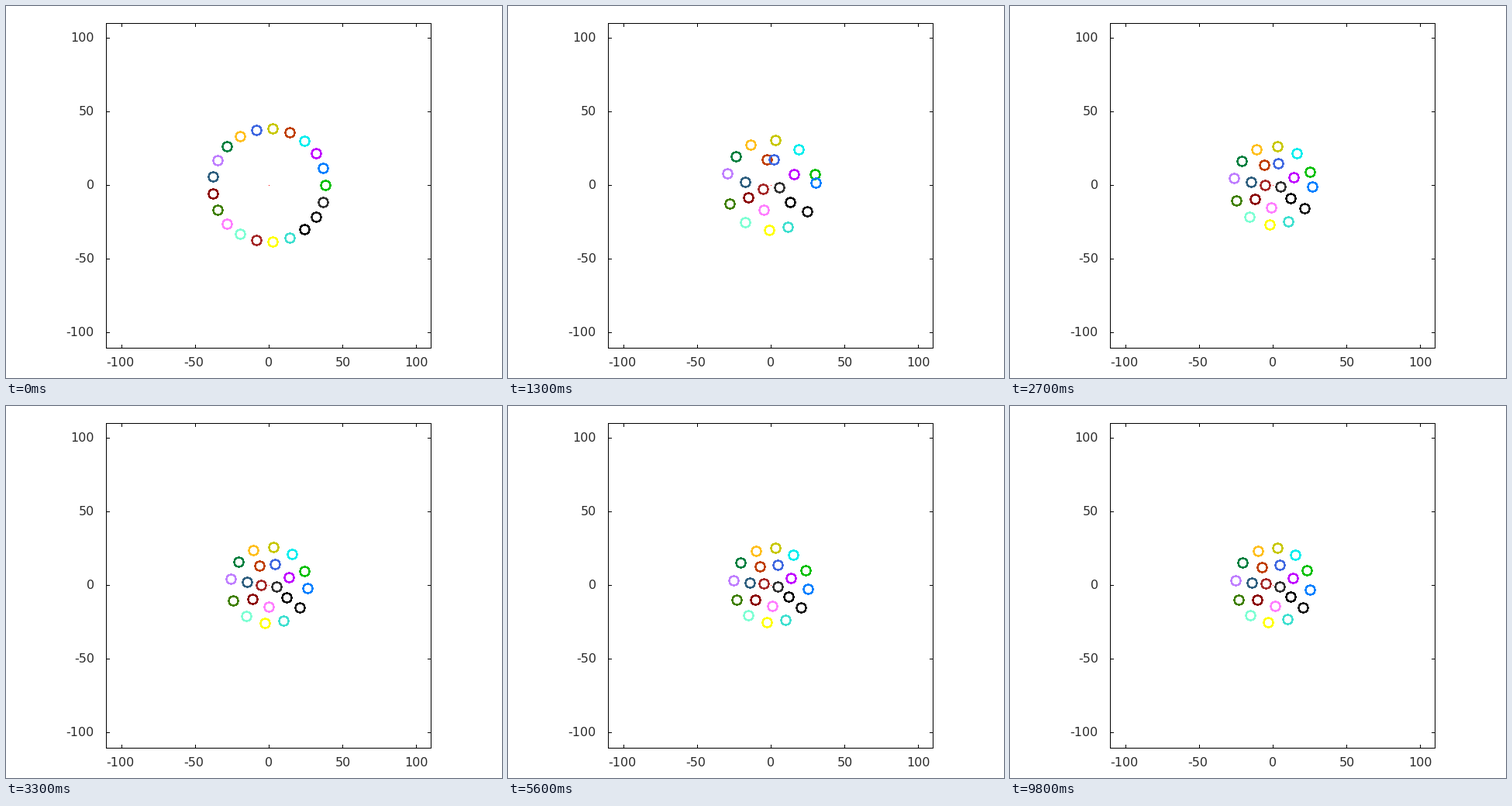
A matplotlib script for the animation above (9.9 s loop, 640 px wide and 480 px high).

```python
import numpy as np
import matplotlib.pyplot as plt
from matplotlib.animation import FuncAnimation
from matplotlib.patches import Rectangle

W, H, DPI = 640, 480, 100
PX = 72 / DPI                      # one pixel in points
LEFT, RIGHT, TOP, BOTTOM = 129.5, 548.5, 22.5, 441.5
CENTER = np.array([339.5, 231.5])
SCALE = (RIGHT - LEFT) / 220       # pixels per axis unit
FRAMES, STEP = 99, 100

COLORS = """#00c000 #0080ff #c000ff #00eeee #c04000 #c8c800 #4169e1
#ffc020 #008040 #c080ff #306080 #8b0000 #408000 #ff80ff #7fffd4 #a52a2a
#ffff00 #40e0d0 #000000 #1a1a1a #333333""".split()
COUNT = len(COLORS)

# The ring collapses, rebounds and relaxes into three concentric shells
RING_RADIUS = 73.3
PINCH_TIME, REBOUND_TIME = 600, 1250
OVERSHOOT, RELAX, TURN = 0.22, 1000, 1500

# members in angular order, first angle, pinched radius, resting radius
SHELLS = [
    ((1, 0, 3, 5, 7, 8, 9, 12, 14, 16, 17, 19), -6.7, 39, 48.3),
    ((2, 6, 4, 10, 11, 13, 18), 18.5, 17, 27.3),
    ((15, 20), 168, 4, 9.5),
]

start_angle = 360 * np.arange(COUNT) / COUNT
rest_angle, pinch_radius, rest_radius = np.zeros((3, COUNT))
for members, first, pinch, rest in SHELLS:
    who = list(members)
    rest_angle[who] = first + 360 * np.arange(len(who)) / len(who)
    pinch_radius[who] = pinch
    rest_radius[who] = rest
turn = (rest_angle - start_angle + 180) % 360 - 180


def blend(a, b, u):
    return a + (b - a) * (1 - np.cos(np.pi * u)) / 2


def radii(ms):
    peak = rest_radius * (1 + OVERSHOOT)
    if ms < PINCH_TIME:
        return blend(RING_RADIUS, pinch_radius, ms / PINCH_TIME)
    if ms < REBOUND_TIME:
        u = (ms - PINCH_TIME) / (REBOUND_TIME - PINCH_TIME)
        return blend(pinch_radius, peak, u)
    fade = np.exp(-(ms - REBOUND_TIME) / RELAX)
    return rest_radius * (1 + OVERSHOOT * fade)


def positions(ms):
    a = np.radians(start_angle + turn * (1 - np.exp(-ms / TURN)))
    offsets = np.column_stack([np.cos(a), -np.sin(a)]) * radii(ms)[:, None] \
        if ms else RING_RADIUS * np.column_stack([np.cos(a), -np.sin(a)])
    return np.floor(CENTER + offsets) + 0.5    # whole pixels


fig = plt.figure(figsize=(W / DPI, H / DPI), dpi=DPI, facecolor="white")
ax = fig.add_axes([0, 0, 1, 1])
ax.set(xlim=(0, W), ylim=(H, 0))
ax.axis("off")


def line(xs, ys):
    ax.plot(xs, ys, color="black", lw=PX, solid_capstyle="projecting",
            snap=False, zorder=1)


def label(x, y, text, align):
    ax.text(x, y, text, ha=align, va="baseline", color="#2a2a2a",
            family="DejaVu Sans", size=16 * PX)


for x in (LEFT, RIGHT):
    line([x, x], [TOP, BOTTOM])
for y in (TOP, BOTTOM):
    line([LEFT, RIGHT], [y, y])

for value in range(-100, 101, 50):
    x = np.floor(CENTER[0] + value * SCALE) + 0.5
    y = np.floor(CENTER[1] - value * SCALE) + 0.5
    line([x, x], [BOTTOM, BOTTOM - 4])
    line([x, x], [TOP, TOP + 4])
    line([LEFT, LEFT + 4], [y, y])
    line([RIGHT, RIGHT - 4], [y, y])
    label(x - 2 * (value < 0), 465, str(value), "center")
    label(114, y + 4.5, str(value), "right")

# Marker at the origin
ax.add_patch(Rectangle(CENTER - 0.5, 1, 1, fc="red", ec="none", snap=False))

dots = ax.scatter(*positions(0).T, s=(12 * PX) ** 2, facecolors="none",
                  edgecolors=COLORS, linewidths=1.1 * PX,
                  antialiased=False, zorder=3)


def update(frame):
    dots.set_offsets(positions(frame * STEP))
    return dots,


anim = FuncAnimation(fig, update, frames=FRAMES, interval=STEP,
                     repeat=True, repeat_delay=0)
plt.show()
```
